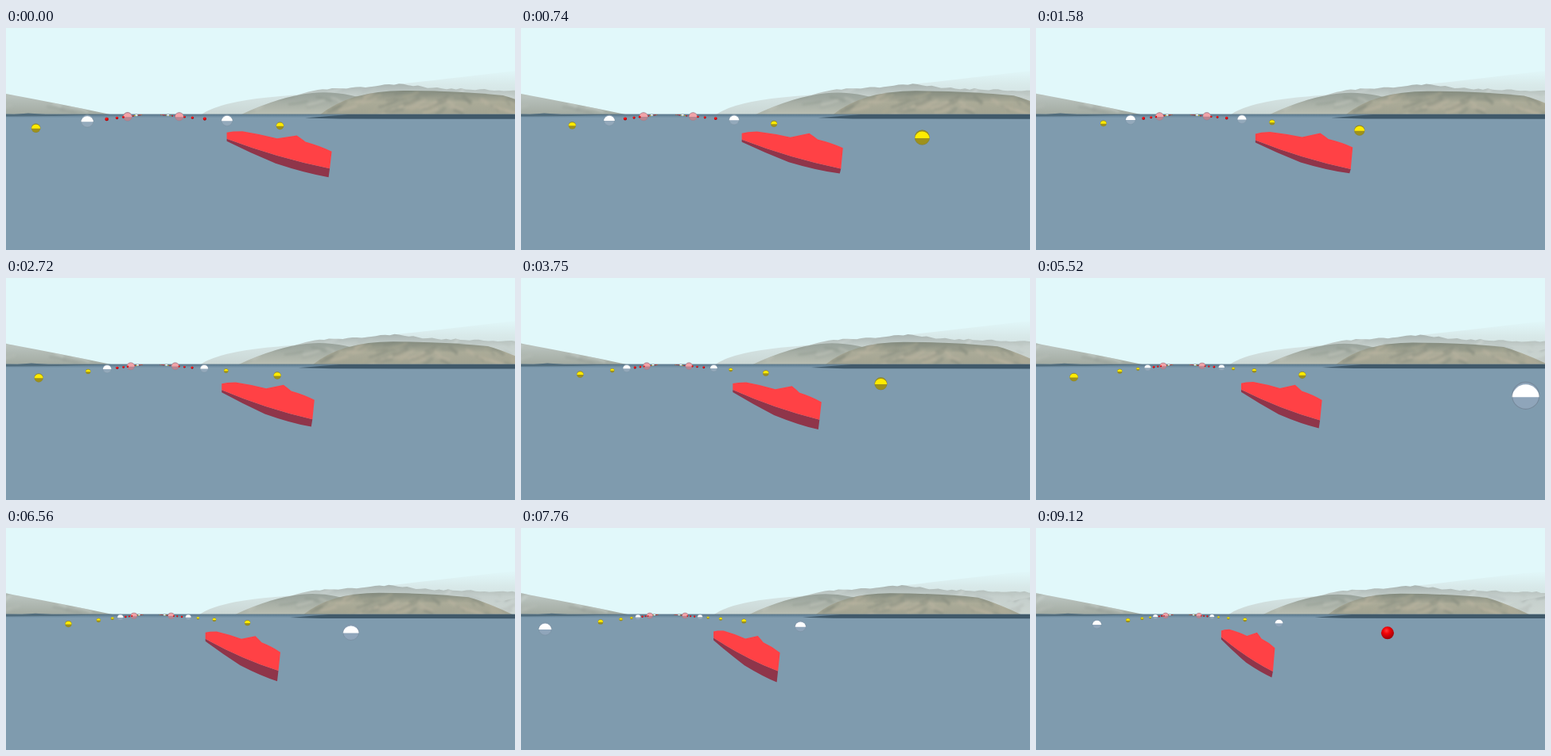
These frames come from a looping animation (640 by 280 pixels, 9.2 s). An HTML page:

```html
<!DOCTYPE html>
<html lang="en">
<head>
<meta charset="utf-8">
<title>Boat on a buoyed course</title>
<style>
html, body { margin: 0; width: 100%; height: 100%; overflow: hidden; background: #e1f8fa; }
svg { display: block; width: 100vw; height: 100vh; }
</style>
</head>
<body>
<svg id="stage" viewBox="0 0 640 280" preserveAspectRatio="none">
  <defs>
    <linearGradient id="water" x2="0" y2="1">
      <stop offset="0" stop-color="#587488"/><stop offset=".012" stop-color="#68869a"/>
      <stop offset=".028" stop-color="#7f9bae"/><stop offset="1" stop-color="#7f9bae"/>
    </linearGradient>
    <linearGradient id="haze" x2="0" y2="1">
      <stop offset=".15" stop-color="#d6e4e4" stop-opacity="0"/><stop offset=".45" stop-color="#d3e0df" stop-opacity=".6"/>
      <stop offset="1" stop-color="#cad6d4"/>
    </linearGradient>
    <linearGradient id="ridge" x2="0" y2="1">
      <stop offset="0" stop-color="#a9b4b1"/><stop offset=".4" stop-color="#c6d0cd"/><stop offset="1" stop-color="#cdd6d2"/>
    </linearGradient>
    <linearGradient id="mid" x2="0" y2="1">
      <stop offset="0" stop-color="#98a29b"/><stop offset="1" stop-color="#b9beb2"/>
    </linearGradient>
    <linearGradient id="front" x2="0" y2="1">
      <stop offset="0" stop-color="#838b7f"/><stop offset=".45" stop-color="#abab98"/><stop offset="1" stop-color="#a1a291"/>
    </linearGradient>
    <linearGradient id="left" x2="0" y2="1">
      <stop offset="0" stop-color="#cbd5d3"/><stop offset=".55" stop-color="#b3bcb6"/><stop offset="1" stop-color="#a3aba2"/>
    </linearGradient>
    <radialGradient id="ball" cx=".42" cy=".32" r=".7">
      <stop offset="0" stop-color="#ff3a3a"/><stop offset=".35" stop-color="#f40408"/><stop offset="1" stop-color="#960008"/>
    </radialGradient>
    <filter id="soft" x="-20%" y="-50%" width="140%" height="200%"><feGaussianBlur stdDeviation="1.6"/></filter>
  </defs>
  <rect width="640" height="112" fill="#e1f8fa"/>
  <g id="hills"></g>
  <rect y="108.6" width="640" height="172" fill="url(#water)"/>
  <g id="shore"></g>
  <g id="buoys"></g>
  <path id="side" fill="#8f354a"/>
  <path id="deck" fill="#ff4145"/>
</svg>
<script>
const LOOP = 9200, VX = 181, HY = 108.2;
const $ = id => document.getElementById(id);

function add(parent, tag, attrs) {
  const el = document.createElementNS('http://www.w3.org/2000/svg', tag);
  for (const k in attrs) el.setAttribute(k, attrs[k]);
  parent.appendChild(el);
  return el;
}

let seed = 11;
const rnd = () => (seed = seed * 16807 % 2147483647) / 2147483647;
const between = (a, b) => a + (b - a) * rnd();

// Land layers: each shrinks towards the vanishing point at its own depth
const layers = [];
function layer(parent, depth) {
  const g = add($(parent), 'g', {});
  layers.push({ g, depth });
  return g;
}

function hill(name, depth, d, tones = [], count = 0) {
  const g = layer('hills', depth);
  const body = add(g, 'path', { d, fill: `url(#${name})` });
  if (!count) return;
  const id = 'clip' + layers.length, box = body.getBBox();
  add(add(g, 'clipPath', { id }), 'path', { d });
  const folds = add(add(g, 'g', { 'clip-path': `url(#${id})` }), 'g', { filter: 'url(#soft)' });
  for (let i = 0; i < count; i++) {
    const x = between(box.x, box.x + box.width), y = between(box.y + 4, box.y + box.height);
    const w = between(8, 26), drop = between(3, 11) * (x < box.x + box.width / 2 ? -1 : 1);
    add(folds, 'path', {
      d: `M${x} ${y}q${w / 2} ${drop * .2} ${w} ${drop}`, fill: 'none',
      stroke: tones[i % tones.length], 'stroke-width': between(2, 5), opacity: .5
    });
  }
}

// Jagged far ridge: steep start, one summit, slow fall to the right
function skyline() {
  let d = 'M330 109';
  for (let x = 338; x <= 800; x += 6) {
    const y = 75 + 34 * Math.exp((335 - x) / 25) - 4 * Math.exp(-(((x - 490) / 30) ** 2)) +
      .03 * Math.max(0, x - 510) + between(-1, 1);
    d += `L${x} ${y}`;
  }
  return d + 'V109Z';
}

hill('haze', 58, 'M246 109Q270 92 345 86T640 54L800 40V109Z');
hill('ridge', 58, skyline(), ['#b3bebb', '#d3dcda', '#bcc5c1'], 36);
hill('mid', 35, 'M296 109Q345 86 385 82T470 96V109Z', ['#8d978d', '#c4c8bd', '#a2aa9f'], 22);
hill('ridge', 23, 'M625 110Q670 80 800 74V112Z', ['#949c99', '#b5bcb8'], 14);
hill('front', 23, 'M394 110Q432 79 500 79T625 85Q650 92 690 111Z',
  ['#bdb5a2', '#83897c', '#aca994', '#8c9183', '#c0b8a3'], 64);
hill('left', 40, 'M-60 70L0 83Q70 96 131 109H-60Z', ['#98a099', '#ccd3cf', '#b5bcb5'], 30);

add(layer('shore', 23), 'path', { d: 'M376 113.4L430 109H800V115L420 114.6Z', fill: '#40596a' });
add(layer('shore', 40), 'path', { d: 'M-60 108L10 109 28 107.6 50 109H130L60 111-60 112Z', fill: '#516c7c' });

// Buoys: pairs at unit spacing along two lanes
const kinds = {
  r: { r: 7.3, low: 'url(#ball)' },
  y: { r: 7, low: '#9e911c', cap: '#ffec00' },
  w: { r: 9.6, low: '#8fa5ba', cap: '#ffffff' },
  G: { r: 17.5, low: '#93a9bb', cap: '#ffffff', rise: 1.5 },
  P: { r: 35, low: '#b98591', cap: '#f2a3a8' }
};
const course = 'rwyyyGrrrPrryGyrrrryr';
const lanes = [{ span: -175, lag: -.235 }, { span: 238, lag: 0 }];
const buoys = [];
for (let i = course.length - 1; i >= 0; i--) {
  const { r, low, cap, rise = 0 } = kinds[course[i]];
  for (const { span, lag } of lanes) {
    const g = add($('buoys'), 'g', {});
    add(g, 'circle', { r: 1, fill: low });
    if (cap) {
      add(g, 'path', { d: 'M-.995 .1A1 1 0 0 1 .995 .1Z', fill: cap });
      add(g, 'circle', { r: .97, fill: 'none', stroke: '#50606c', 'stroke-width': .06, opacity: .4 });
    }
    buoys.push({ g, span, r, drop: 22 - rise, at: i - 2.545 + lag });
  }
}

// The boat turns away while the waves rock it
function drawBoat(s) {
  const rock = Math.cos(2 * Math.PI * (s - 1.58) / .932);
  const bowX = 278 - 1.5 * s - .39 * s * s + 1.2 * rock;
  const bowY = 131.8 + .9 * s - .13 * s * s + .5 * rock;
  const len = 132 - s * (7 - .7 * s + .0776 * s * s);
  const sternY = 154.5 - 4 * rock, edgeY = 177.2 + .43 * s, footY = 186.7 + .6 * s - 4.5 * rock;

  const on = (y0, y1) => (along, lift) => [bowX + len * along, y0 + (y1 - y0) * along - lift];
  const rail = on(bowY, sternY), sheer = on(bowY + 8, edgeY), keel = on(bowY + 11, footY);
  const end = (y, dx) => [bowX + len - dx, y];
  const edge = end(edgeY, 2.5), foot = end(footY, 4);

  $('side').setAttribute('d',
    `M${rail(0, -4)}L${keel(0, 0)}Q${keel(.22, -4.5)} ${keel(.465, -7)}Q${keel(.75, -6.5)} ${foot}` +
    `L${edge}Q${sheer(.48, -6)} ${sheer(0, 0)}Z`);
  $('deck').setAttribute('d',
    `M${rail(0, 0)}L${rail(.06, 2.6)} ${rail(.15, 5)}Q${rail(.32, 5.5)} ${rail(.48, 4)}` +
    `L${rail(.667, 12.3)}Q${rail(.72, 8.8)} ${rail(.75, 6.2)}Q${rail(.89, 4.5)} ${rail(1, 0)}` +
    `L${edge}Q${sheer(.48, -6)} ${sheer(0, 0)}Z`);
}

function draw(ms) {
  const s = ms / 1000, dist = .379 * s;
  for (const { g, depth } of layers) {
    const k = depth / (depth + dist);
    g.setAttribute('transform', `translate(${VX} ${HY})scale(${k})translate(${-VX} ${-HY})`);
  }
  for (const { g, span, r, drop, at } of buoys) {
    const d = at + dist, near = d > .25;
    g.setAttribute('visibility', near ? 'visible' : 'hidden');
    if (near) g.setAttribute('transform', `translate(${VX + span / d} ${HY + drop / d})scale(${r / d})`);
  }
  drawBoat(s);
}

const start = performance.now();
function tick() {
  draw((performance.now() - start) % LOOP);
  requestAnimationFrame(tick);
}
tick();
</script>
</body>
</html>
```
